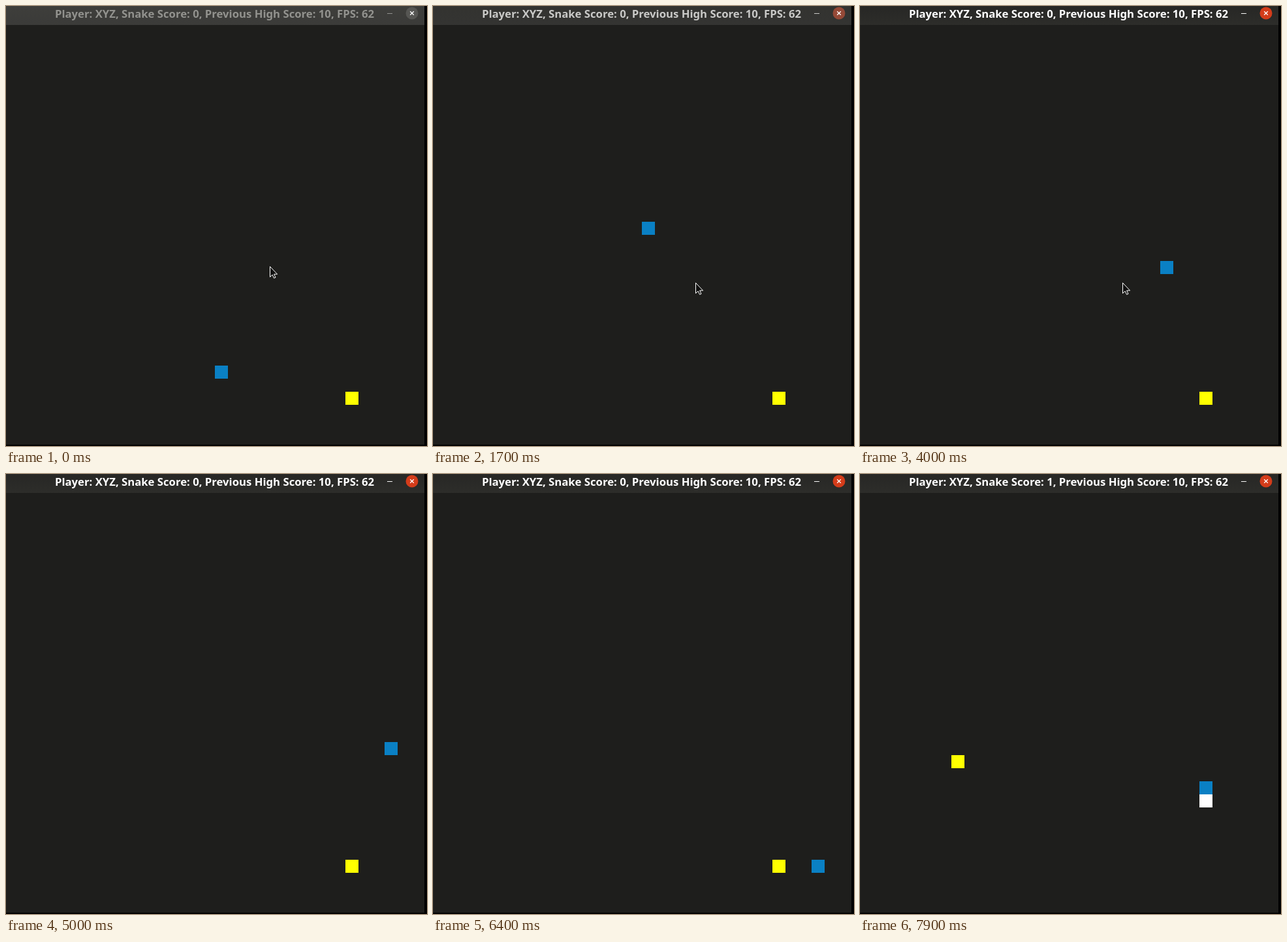
An HTML page that plays this animation: 645 by 673 pixels, repeating every 8 s.

```html
<!DOCTYPE html>
<html lang="en">
<head>
<meta charset="utf-8">
<title>Snake</title>
<style>
  html, body { margin: 0; width: 100%; height: 100%; overflow: hidden; background: #000; }
  svg { display: block; width: 645px; height: 673px; }
  text { font: 700 16.72px "Noto Sans", "Open Sans", sans-serif; }
</style>
</head>
<body>
<svg viewBox="0 0 645 673">
  <defs>
    <linearGradient id="shade" x1="0" y1="0" x2="0" y2="1">
      <stop id="top" offset="0"/>
      <stop id="low" offset="1"/>
    </linearGradient>
  </defs>
  <rect width="645" height="673" fill="#000"/>
  <rect width="641" height="671" fill="#1e1e1c"/>
  <rect width="641" height="29" fill="url(#shade)"/>
  <text id="label" x="319.5" y="18" text-anchor="middle"></text>
  <path id="minimise" d="M584 11.5h8"/>
  <circle id="close" cx="622" cy="11" r="9.5"/>
  <path d="M619.2 8.2l5.6 5.6M624.8 8.2l-5.6 5.6" stroke="#fff" stroke-width="1.3"/>
  <g shape-rendering="crispEdges">
    <rect id="food" width="20" height="20" fill="#ff0"/>
    <rect id="tail" width="20" height="20" fill="#fff"/>
    <rect id="head" width="20" height="20" fill="#0a80c4"/>
  </g>
  <path id="cursor" d="M.5.5v16l3.6-3.4 2.5 5.2 2.4-1.1-2.4-5h5z" fill="#10100f" stroke="#fff"/>
</svg>
<script>
const LOOP = 8000, CELL = 20, EAT = 7200, SCORED = 7900;
const DIRS = { U: [0, -1], D: [0, 1], L: [-1, 0], R: [1, 0] };

// Each run: directions, then the tenths of a second at which they happen.
const runs = [
  ['UUUUUUU', [2, 4, 5, 7, 8, 10, 11]],
  ['UUUUU', [13, 14, 16, 17, 19]],
  ['RRDDDDR', [23, 25, 26, 28, 30, 31, 33]],
  ['RRRRRRR', [35, 37, 38, 40, 42, 43, 44]],
  ['RRRDDDD', [46, 47, 49, 50, 52, 53, 55]],
  ['DDDDDDDL', [57, 58, 60, 61, 63, 64, 66, 67]],
  ['LLUUUUUUU', [68, 70, 72, 72, 73, 75, 76, 78, 79]]
];

const path = [{ t: 0, x: 320, y: 550 }];
for (const [moves, times] of runs) {
  [...moves].forEach((move, i) => {
    const last = path[path.length - 1], [dx, dy] = DIRS[move];
    path.push({ t: times[i] * 100, x: last.x + dx * CELL, y: last.y + dy * CELL });
  });
}

// Pointer position and window focus, held until the next entry.
const pointer = [[0, 404, 398], [1400, 403, 408], [1500, 402, 423]];
const focus = [[0, 0], [1700, 0.5], [1800, 1]];

const $ = id => document.getElementById(id);
const set = (id, attrs) => {
  for (const key in attrs) $(id).setAttribute(key, attrs[key]);
};
const held = (steps, t) => steps.filter(s => s[0] <= t).pop();
const mix = (a, b, k) => `rgb(${a.map((v, i) => Math.round(v + (b[i] - v) * k))})`;

function drawBar(t) {
  const k = held(focus, t)[1];
  const ink = mix([146, 146, 142], [255, 255, 255], k);
  set('top', { 'stop-color': mix([62, 62, 59], [39, 39, 37], k) });
  set('low', { 'stop-color': mix([59, 59, 57], [45, 45, 42], k) });
  set('label', { fill: ink });
  set('minimise', { stroke: ink });
  set('close', { fill: mix([86, 86, 83], [212, 60, 26], k) });
  const score = t >= SCORED ? 1 : 0;
  $('label').textContent =
    `Player: XYZ, Snake Score: ${score}, Previous High Score: 10, FPS: 62`;
}

function draw(t) {
  drawBar(t);
  const done = path.filter(p => p.t <= t);
  const head = done[done.length - 1], prev = done[done.length - 2] || head;
  const eaten = t >= EAT;
  set('head', { x: head.x, y: head.y });
  set('tail', { x: prev.x, y: prev.y, visibility: eaten ? 'visible' : 'hidden' });
  set('food', eaten ? { x: 140, y: 430 } : { x: 520, y: 590 });
  const [, x, y] = held(pointer, t);
  set('cursor', {
    transform: `translate(${x} ${y})`,
    visibility: t < 4300 ? 'visible' : 'hidden'
  });
}

const start = performance.now();
function tick() {
  draw((performance.now() - start) % LOOP);
  requestAnimationFrame(tick);
}
tick();
</script>
</body>
</html>
```
